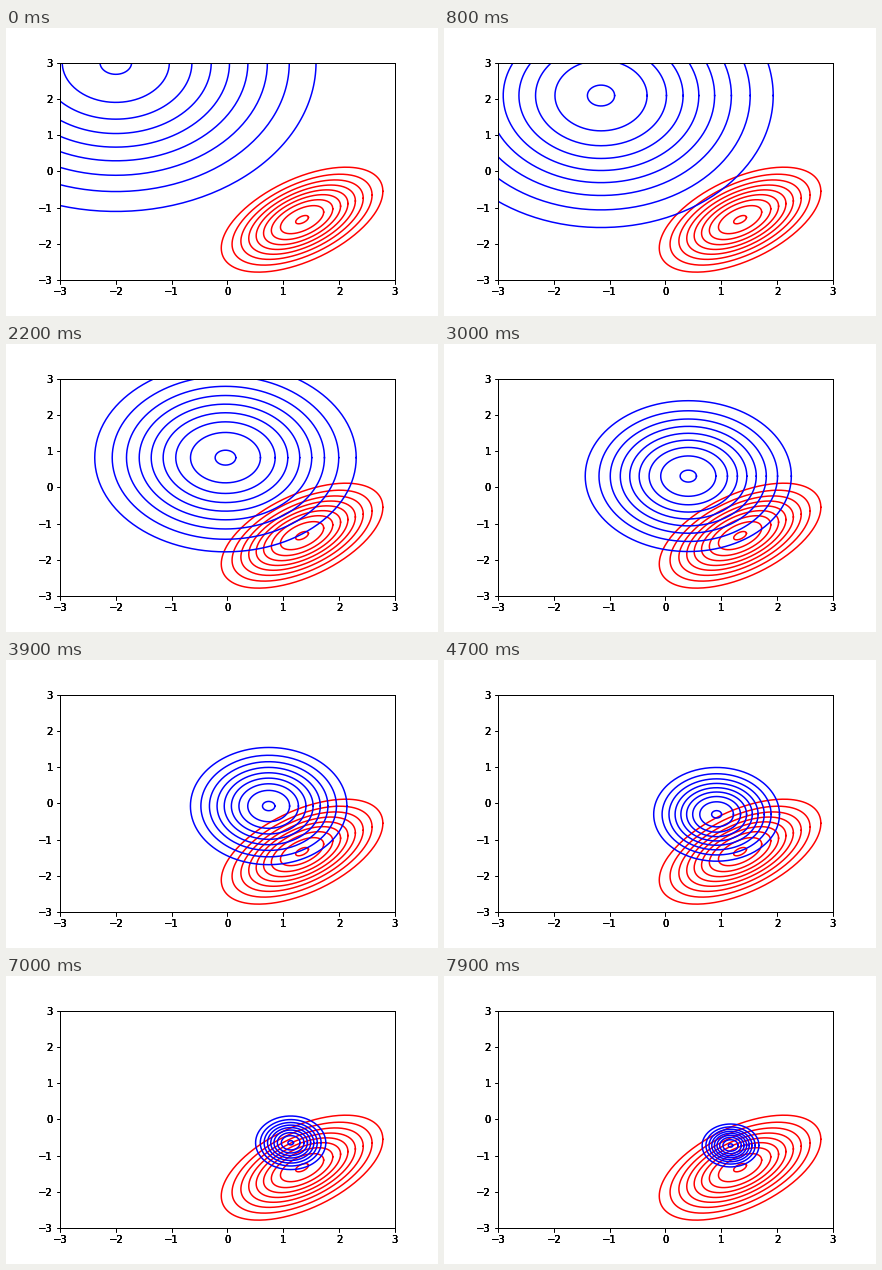
Recreate the animation shown at these times as a matplotlib script. Size 432 by 288 pixels, loop 8 s.

```python
import numpy as np
import matplotlib.pyplot as plt
from matplotlib.animation import FuncAnimation

FRAMES, INTERVAL = 80, 100
LEVELS = np.linspace(0.2, 0.99, 9)          # contour heights relative to the peak
RADII = np.sqrt(-2 * np.log(LEVELS))
THETA = np.linspace(0, 2 * np.pi, 241)

# Fitted Gaussian over time: centre and standard deviations
TIMES = np.array([0, 800, 1800, 2700, 3600, 4500, 5400, 6300, 7200, 7900.0])
PATH = np.array([
    [-2, -1.154, -0.312, 0.262, 0.647, 0.880, 1.014, 1.095, 1.143, 1.167],
    [3, 2.09, 1.135, 0.477, 0.035, -0.255, -0.445, -0.575, -0.667, -0.723],
    [2, 1.72, 1.445, 1.127, 0.853, 0.663, 0.525, 0.417, 0.334, 0.2835],
    [2.29, 2.03, 1.61, 1.26, 0.982, 0.760, 0.608, 0.490, 0.392, 0.330],
])
SLOPES = np.gradient(PATH, TIMES, axis=1, edge_order=2)


def state(t):
    """Cubic Hermite interpolation of (cx, cy, sx, sy) at time t."""
    i = min(np.searchsorted(TIMES, t, side="right") - 1, len(TIMES) - 2)
    h = TIMES[i + 1] - TIMES[i]
    u = (t - TIMES[i]) / h
    return ((1 + 2 * u) * (1 - u) ** 2 * PATH[:, i]
            + u * (1 - u) ** 2 * h * SLOPES[:, i]
            + u * u * (3 - 2 * u) * PATH[:, i + 1]
            + u * u * (u - 1) * h * SLOPES[:, i + 1])


def contours(cx, cy, sx, sy, rho=0.0):
    """Contour ellipses of a bivariate normal, one (x, y) pair per level."""
    x = np.cos(THETA)
    y = rho * x + np.sqrt(1 - rho ** 2) * np.sin(THETA)
    return [(cx + sx * r * x, cy + sy * r * y) for r in RADII]


plt.rcParams.update({
    "font.family": "DejaVu Sans",
    "font.size": 10,
    "figure.subplot.bottom": 0.125,
    "lines.linewidth": 1.5,
})
fig = plt.figure(figsize=(6, 4), dpi=72, facecolor="white")

# Stacked axes give the heavy look of the tick labels
layers = [fig.add_subplot(label=f"layer{k}") for k in range(4)]
for layer in layers:
    layer.set(xlim=(-3, 3), ylim=(-3, 3),
              xticks=range(-3, 4), yticks=range(-3, 4))
    layer.patch.set_visible(False)
ax = layers[0]

for x, y in contours(1.338, -1.335, 0.807, 0.807, 0.54):
    ax.plot(x, y, color="red")
blue = [ax.plot([], [], color="blue")[0] for _ in RADII]


def update(frame):
    for line, (x, y) in zip(blue, contours(*state(frame * INTERVAL))):
        line.set_data(x, y)
    return blue


anim = FuncAnimation(fig, update, frames=FRAMES, interval=INTERVAL,
                     repeat=True, repeat_delay=0, blit=False)
plt.show()
```
